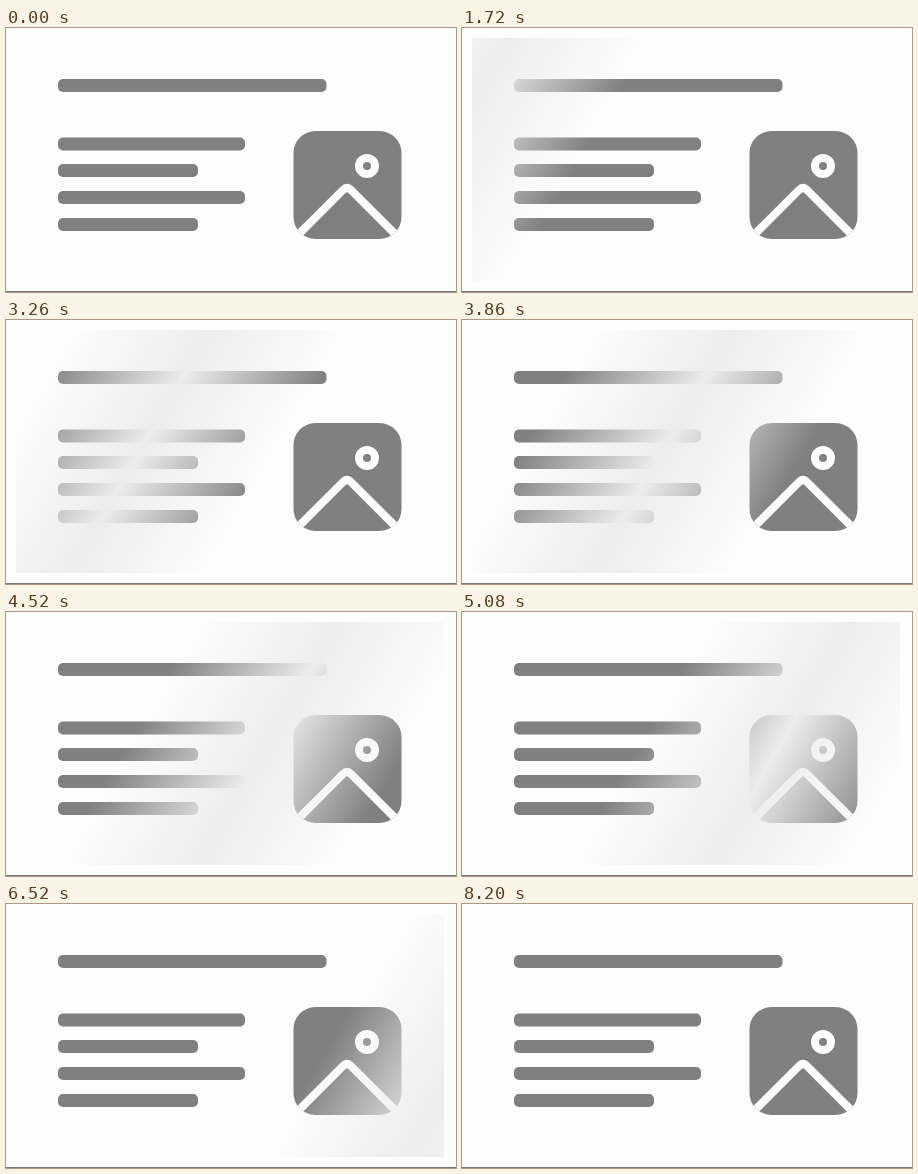
These frames come from a looping animation (450x264 px, 8780 ms). An HTML page with a canvas:

```html
<!DOCTYPE html>
<html lang="en">
<head>
<meta charset="utf-8">
<title>Skeleton shimmer</title>
<style>
  html, body { margin: 0; width: 100%; height: 100%; overflow: hidden; background: #fdfdfd; }
  canvas { display: block; }
</style>
</head>
<body>
<canvas width="450" height="264"></canvas>
<script>
const ctx = document.querySelector('canvas').getContext('2d');
const LOOP = 8780;
const STEPS = 180;
const LAST_STEP = 178;
const PAPER = '#fdfdfd';
const INK = '#808080';
const SHINE = '237, 237, 237';
const CARD = { x: 10, y: 10, w: 428, h: 243 };
const ANGLE = Math.PI / 6;

// x, y, width
const BARS = [[52, 51, 268.5], [52, 109.5, 187], [52, 136, 140], [52, 163, 187], [52, 190, 140]];

// The sweep advances in groups of three steps: 20, 20 and 100 ms.
function stepAt(t) {
  if (t < 40) return Math.floor(t / 20);
  const group = Math.floor((t - 40) / 140);
  const rest = (t - 40) % 140;
  return Math.min(LAST_STEP, 2 + 3 * group + Math.min(2, Math.floor(rest / 20)));
}

function fillRound(x, y, w, h, r) {
  ctx.beginPath();
  ctx.roundRect(x, y, w, h, r);
  ctx.fill();
}

function drawPicture() {
  ctx.save();
  fillRound(287.5, 103, 108, 108, 22);
  ctx.clip();
  ctx.strokeStyle = PAPER;
  ctx.lineWidth = 8;
  ctx.beginPath();
  ctx.arc(361, 138, 8, 0, 2 * Math.PI);
  ctx.stroke();
  ctx.beginPath();
  ctx.moveTo(282, 217);
  ctx.lineTo(337, 162);
  ctx.quadraticCurveTo(341, 158, 345, 162);
  ctx.lineTo(400, 217);
  ctx.stroke();
  ctx.restore();
}

// A slanted band slides from one card width left of the card to one right of it.
function drawShimmer(progress) {
  const { x, y, w, h } = CARD;
  const cx = x + w / 2 + (2 * progress - 1) * w;
  const cy = y + h / 2;
  const cos = Math.cos(ANGLE), sin = Math.sin(ANGLE);
  const halfBand = (w * cos + h * sin) / 4;
  const dx = halfBand * cos, dy = halfBand * sin;
  const band = ctx.createLinearGradient(cx - dx, cy - dy, cx + dx, cy + dy);
  band.addColorStop(0, `rgba(${SHINE}, 0)`);
  band.addColorStop(0.5, `rgba(${SHINE}, 1)`);
  band.addColorStop(1, `rgba(${SHINE}, 0)`);
  ctx.fillStyle = band;
  ctx.fillRect(x, y, w, h);
}

function draw(t) {
  ctx.fillStyle = PAPER;
  ctx.fillRect(0, 0, 450, 264);
  ctx.fillStyle = '#777';
  ctx.fillRect(0, 263, 450, 1);

  ctx.fillStyle = INK;
  for (const [x, y, width] of BARS) fillRound(x, y, width, 13, 5);
  drawPicture();
  drawShimmer(stepAt(t) / STEPS);
}

const start = performance.now();
function tick() {
  draw((performance.now() - start) % LOOP);
  requestAnimationFrame(tick);
}
tick();
</script>
</body>
</html>
```
